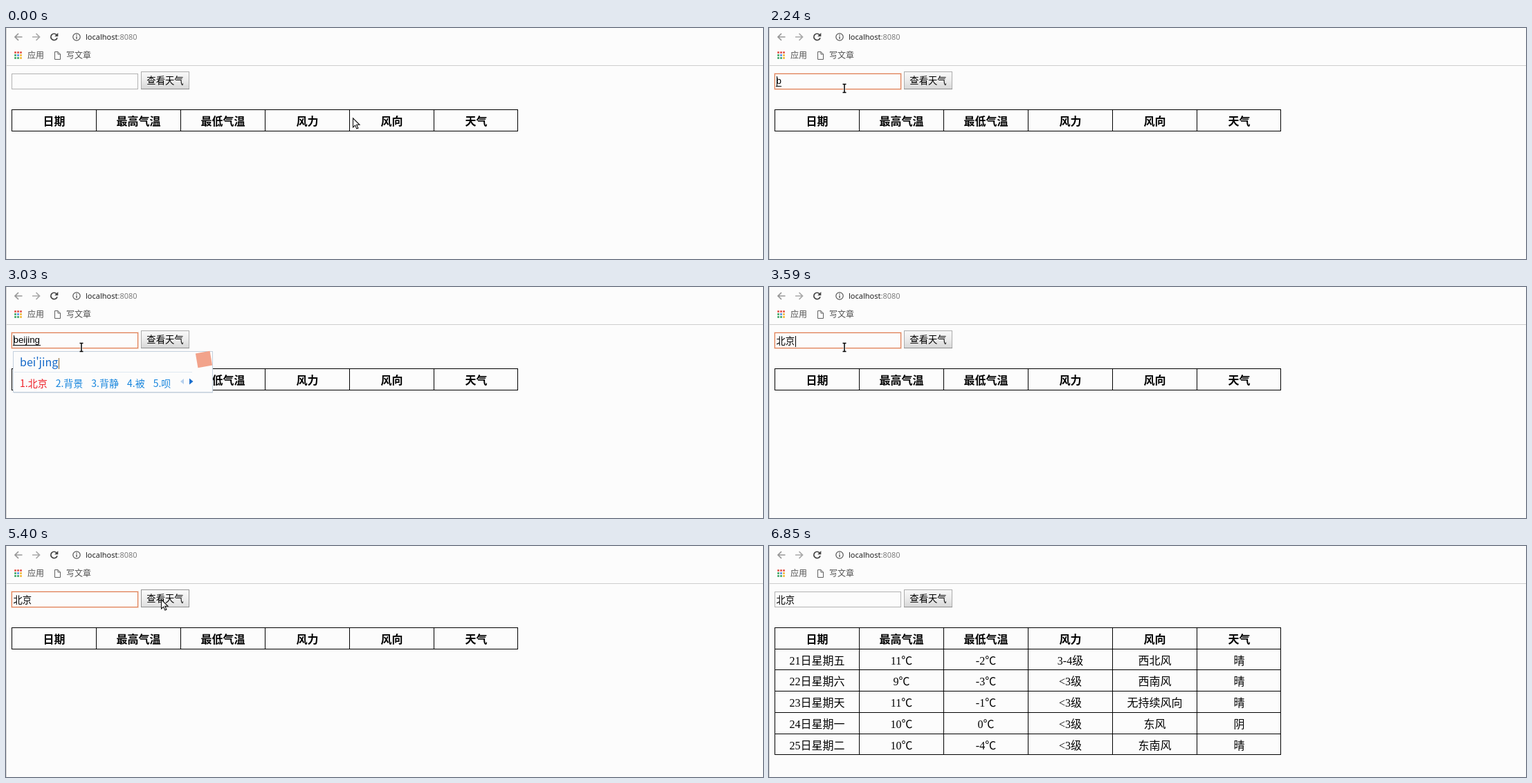
Recreate the animation shown at these times as an HTML page with a canvas. Size 1094 by 335 pixels, loop 7840 ms.

```html
<!DOCTYPE html>
<html lang="zh-CN">
<head>
<meta charset="utf-8">
<title>天气查询</title>
<style>
html, body { margin: 0; width: 100%; height: 100%; overflow: hidden; background: #fcfcfc; }
canvas { display: block; }
</style>
</head>
<body>
<canvas id="stage" width="1094" height="335"></canvas>
<script>
const ctx = document.getElementById('stage').getContext('2d');
const LOOP = 7840;
const PAPER = '#fcfcfc';
const CJK = '"Noto Sans CJK SC", "Noto Sans CJK", sans-serif';
const CONTROL = '13.333px "Liberation Sans", ' + CJK;
const SERIF = '16px "Liberation Serif", "Noto Sans CJK SC", "Noto Sans CJK", serif';

const HEADERS = ['日期', '最高气温', '最低气温', '风力', '风向', '天气'];
const FORECAST = [
  ['21日星期五', '11℃', '-2℃', '3-4级', '西北风', '晴'],
  ['22日星期六', '9℃', '-3℃', '<3级', '西南风', '晴'],
  ['23日星期天', '11℃', '-1℃', '<3级', '无持续风向', '晴'],
  ['24日星期一', '10℃', '0℃', '<3级', '东风', '阴'],
  ['25日星期二', '10℃', '-4℃', '<3级', '东南风', '晴']
];

// Input method: typed letters with their candidate words
const COMPOSING = [
  ['b', '不是 不要 不能 不知道 并且'],
  ['be', '本来 被动 背后 被子 备用'],
  ['bei', '被 北 背 杯 倍'],
  ["bei'j", '北京 背景 背脊 被 呗'],
  ["bei'ji", '北极 背脊 悲剧 被 呗'],
  ["bei'jin", '北京 背景 背静 被 呗'],
  ["bei'jing", '北京 背景 背静 被 呗']
];

// Pointer moves: start, end, number of steps, then [time, x, y] points
const MOVES = [
  { start: 60, end: 810, steps: 13, path: [[60, 496, 130], [250, 420, 117], [375, 310, 98], [440, 251, 89], [500, 205, 83], [560, 160, 76], [685, 126, 77], [810, 114, 81]] },
  { start: 860, end: 930, steps: 2, path: [[860, 111, 84], [930, 109, 87]] },
  { start: 4400, end: 5150, steps: 13, path: [[4400, 113, 84], [4650, 172, 56], [4810, 196, 60], [5150, 224, 77]] },
  { start: 6210, end: 6850, steps: 10, path: [[6210, 227, 80], [6500, 405, 196], [6780, 604, 329], [6850, 640, 360]] }
];

function along(path, t) {
  const i = Math.max(1, path.findIndex(p => p[0] >= t));
  const [a, b] = [path[i - 1], path[i]];
  const k = (t - a[0]) / (b[0] - a[0]);
  return [a[1] + (b[1] - a[1]) * k, a[2] + (b[2] - a[2]) * k].map(Math.round);
}

function pointerAt(t) {
  const move = MOVES.filter(m => t >= m.start).pop();
  if (!move) return [501, 130];
  const step = (move.end - move.start) / (move.steps - 1);
  const n = Math.min(move.steps - 1, Math.floor((t - move.start) / step + 1e-6));
  return along(move.path, n === move.steps - 1 ? move.end : move.start + n * step);
}

function rect(x, y, w, h, color) {
  ctx.fillStyle = color;
  ctx.fillRect(x, y, w, h);
}

function frame(x, y, w, h, color) {
  ctx.strokeStyle = color;
  ctx.lineWidth = 1;
  ctx.strokeRect(x + .5, y + .5, w - 1, h - 1);
}

function text(str, x, y, font, color, align = 'left') {
  ctx.font = font;
  ctx.fillStyle = color;
  ctx.textAlign = align;
  ctx.fillText(str, x, y);
}

function shape(d, { stroke, fill, width = 1, x = 0, y = 0 }) {
  const path = new Path2D(d);
  ctx.save();
  ctx.translate(x, y);
  if (fill) { ctx.fillStyle = fill; ctx.fill(path); }
  if (stroke) { ctx.strokeStyle = stroke; ctx.lineWidth = width; ctx.stroke(path); }
  ctx.restore();
}

function drawToolbar() {
  rect(0, 0, 1, 335, '#d2d2d2');
  rect(0, 54, 1094, 1, '#cdcdcd');
  shape('M23.5 13H13M18 8l-5 5l5 5', { stroke: '#979797', width: 1.7 });
  shape('M38 13h10.500M43.500 8l5 5l-5 5', { stroke: '#a8a8a8', width: 1.7 });
  shape('M73.300 10.200A4.700 4.700 0 1 0 74 14.200', { stroke: '#444', width: 1.7 });
  shape('M75.300 7v5.200h-5.200z', { fill: '#444' });
  shape('M107.200 13a5.200 5.200 0 1 1-10.400 0a5.200 5.200 0 1 1 10.400 0', { stroke: '#555', width: 1.2 });
  rect(101.3, 12.2, 1.4, 3.8, '#555');
  rect(101.3, 9.7, 1.4, 1.4, '#555');
  const font = '11px "Noto Sans", sans-serif';
  text('localhost', 115, 17, font, '#202020');
  text(':8080', 115 + ctx.measureText('localhost').width, 17, font, '#7c7c7c');

  const [red, green, blue, yellow] = ['#e0453a', '#2fa05a', '#4286e8', '#f0b429'];
  [red, red, red, green, blue, yellow, green, green, yellow].forEach((color, i) =>
    rect(12.2 + i % 3 * 4, 34.2 + Math.floor(i / 3) * 4, 2.6, 2.6, color));
  text('应用', 31, 44, '12px ' + CJK, '#505050');
  shape('M70.500 34.500h4.500l3.500 3.500v7.500h-8zM75 34.500v3.500h3.500', { stroke: '#606060' });
  text('写文章', 87, 44, '12px ' + CJK, '#505050');
}

function drawInput(t) {
  const focused = t >= 1180 && t < 5590;
  if (focused) frame(7, 65, 185, 25, 'rgba(223, 116, 68, .25)');
  frame(8, 66, 183, 23, focused ? '#df7c50' : '#b2b2b2');

  if (t >= 3590) {
    text('北京', 10.5, 83, CONTROL, '#000');
  } else if (t >= 2240) {
    const typed = COMPOSING[letterIndex(t)][0].replace("'", '');
    text(typed, 10.5, 81, CONTROL, '#000');
    rect(10, 84, Math.round(ctx.measureText(typed).width) + 1, 1, '#000');
  }

  const early = t >= 1180 && t < 1790 || t >= 2240 && t < 3590;
  const late = t >= 3590 && t < 4150 || t >= 4720 && t < 5400;
  if (early) rect(11, 70, 1, 15, '#000');
  if (late) rect(38, 71, 1, 16, '#000');
}

function drawButton(hover, pressed) {
  const fill = ctx.createLinearGradient(0, 63, 0, 89);
  const stops = pressed ? ['#d4d4d4', '#dcdcdc', '#e4e4e4']
    : hover ? ['#fbfbfb', '#efefef', '#dddddd'] : ['#f9f9f9', '#ececec', '#d6d6d6'];
  stops.forEach((color, i) => fill.addColorStop(i / 2, color));
  rect(195, 63, 70, 26, fill);
  frame(195, 63, 70, 26, hover ? '#949494' : '#adadad');
  rect(195, 88, 70, 1, '#8e8e8e');
  text('查看天气', 230, 81, CONTROL, '#000', 'center');
}

function drawTable(t) {
  const rows = t >= 5710 ? FORECAST : [];
  const lineX = i => Math.min(739, 8 + i * 122);
  const lineY = i => 118 + Math.round(i * 30.7);
  const bottom = lineY(rows.length + 1);
  for (let i = 0; i <= rows.length + 1; i++) rect(8, lineY(i), 732, 1, '#000');
  for (let i = 0; i <= 6; i++) rect(lineX(i), 118, 1, bottom - 117, '#000');
  const columnX = i => 69.5 + i * 122;
  HEADERS.forEach((label, i) =>
    text(label, columnX(i), 141, 'bold 16px ' + CJK, '#000', 'center'));
  rows.forEach((row, r) => row.forEach((cell, i) =>
    text(cell, columnX(i), lineY(r + 1) + 23, SERIF, '#000', 'center')));
}

function letterIndex(t) {
  return t < 2530 ? 0 : Math.min(6, 1 + Math.floor((t - 2530) / 100));
}

function drawCandidates(t) {
  if (t < 2290 || t >= 3590) return;
  const [pinyin, list] = COMPOSING[letterIndex(t)];
  const words = list.split(' ').map((word, i) => `${i + 1}.${word}`);
  ctx.font = '14px ' + CJK;
  const widths = words.map(word => ctx.measureText(word).width);
  const end = Math.round(20 + widths.reduce((sum, w) => sum + w + 12, -12));
  const right = end + 61;

  rect(10, 93, right - 10, 61, PAPER);
  frame(10, 93, right - 10, 60, '#c3d0dd');
  rect(11, 153, right - 11, 1, '#dce2e8');
  rect(12, 123, right - 42, 1, '#dfe8f2');

  ctx.save();
  ctx.translate(right - 13, 105);
  ctx.rotate(-.17);
  rect(-10.5, -10.5, 21, 21, '#f2a38b');
  ctx.restore();

  text(pinyin, 20, 115, '16px ' + CJK, '#1368c8');
  rect(21 + Math.round(ctx.measureText(pinyin).width), 103, 1, 16, '#8a6530');
  let x = 20;
  words.forEach((word, i) => {
    text(word, x, 145, '14px ' + CJK, i ? '#1685dd' : '#ee1c25');
    x += widths[i] + 12;
  });
  shape('M5 -4v8l-5 -4z', { fill: '#b5d0ee', x: end + 14, y: 137 });
  shape('M0 -4.500v9l5.500 -4.500z', { fill: '#1b6fcd', x: end + 27, y: 137 });
}

function drawPointer(x, y) {
  const overInput = x >= 8 && x < 191 && y >= 66 && y < 89;
  if (overInput) {
    const beam = 'M-2.500 -5.500h2l.500 .500l.500 -.500h2M0 -5v11M-2.500 6.500h2l.500 -.500l.500 .500h2';
    shape(beam, { stroke: '#fff', width: 3, x, y });
    shape(beam, { stroke: '#000', width: 1.5, x, y });
  } else {
    shape('M.500 .800v13.200l3.100 -2.900l2.200 5l2.100 -.900l-2.200 -4.900h4.300z',
      { fill: '#fff', stroke: '#111', width: 1.1, x, y });
  }
}

function draw(t) {
  const [x, y] = pointerAt(t);
  const hover = x >= 195 && x < 265 && y >= 63 && y < 89;
  rect(0, 0, 1094, 335, PAPER);
  drawToolbar();
  drawInput(t);
  drawButton(hover, t >= 5590 && t < 5710);
  drawTable(t);
  drawCandidates(t);
  drawPointer(x, y);
}

const began = performance.now();
function tick() {
  draw((performance.now() - began) % LOOP);
  requestAnimationFrame(tick);
}
tick();
</script>
</body>
</html>
```
